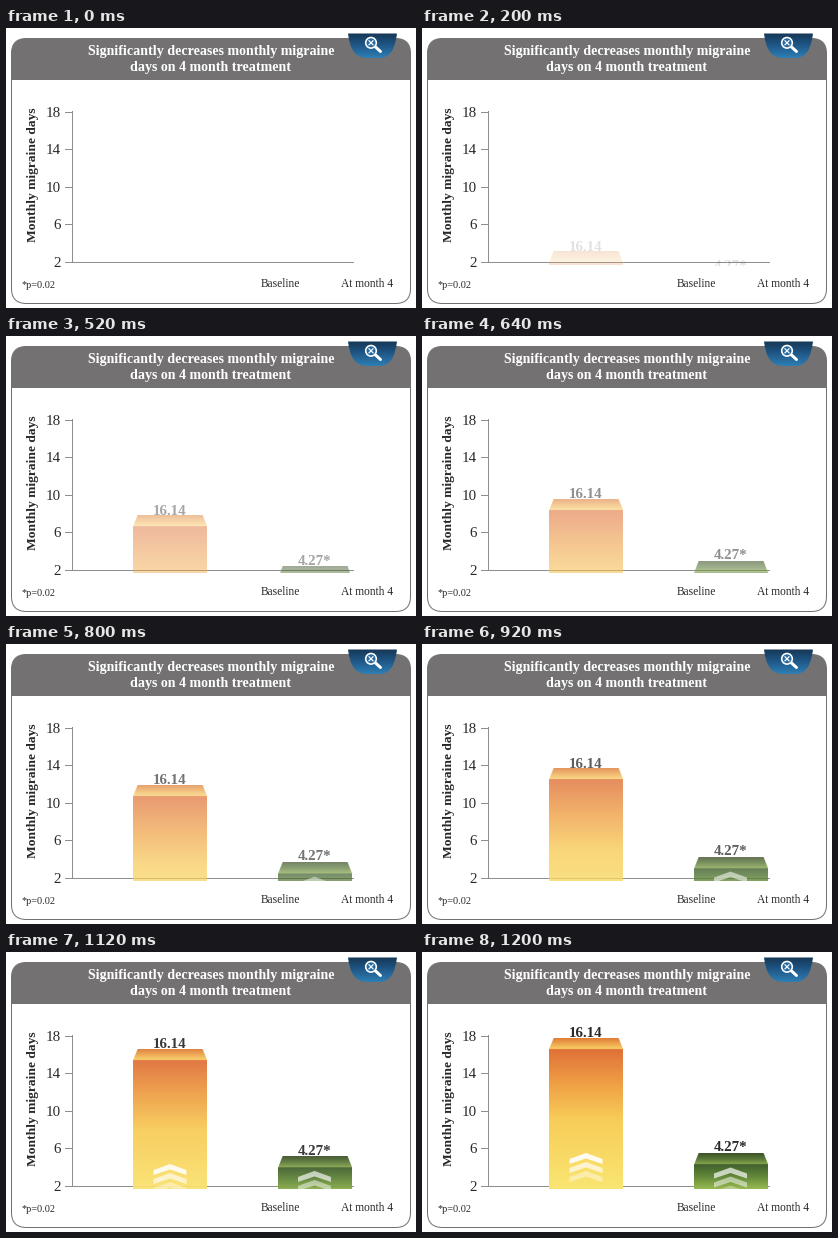
Write a matplotlib script that moves like this. It is 410x280 px and loops after 8 s.

```python
import numpy as np
import matplotlib.pyplot as plt
from matplotlib.animation import FuncAnimation
from matplotlib.colors import to_rgb
from matplotlib.patches import Circle, FancyBboxPatch, PathPatch, Polygon, Rectangle
from matplotlib.path import Path
from matplotlib.transforms import Affine2D

W, H = 410, 280
DPI = 80           # divides both sides into exact binary fractions
PT = 72 / DPI      # points per pixel
STEP = 40          # ms per frame
FRAMES = 200
FIRST, LAST = 1, 30  # frames between which the bars rise
FLOOR = 237.5      # bars are hidden below this line

GREY = "#737172"
INK = "#2b2829"
AXIS = "#8f8d8e"
ORANGE = [(0, "#e07038"), (0.25, "#efa045"), (0.5, "#f8cc58"), (1, "#fae672")]
ORANGE_CAP = [(0, "#dd7c36"), (0.5, "#eea44c"), (1, "#f8d166")]
GREEN = [(0, "#3f5f2d"), (0.5, "#648a3a"), (1, "#9abb52")]
GREEN_CAP = [(0, "#3c5029"), (0.5, "#587637"), (1, "#86a64b")]

fig = plt.figure(figsize=(W / DPI, H / DPI), dpi=DPI, facecolor="white")


def layer(height, z):
    """Transparent axes in pixel units, y down, covering the top of the stage."""
    ax = fig.add_axes([0, 1 - height / H, 1, height / H], zorder=z)
    ax.set(xlim=(0, W), ylim=(height, 0))
    ax.axis("off")
    return ax


def ramp(stops, n):
    """Column of n colours running through the given stops."""
    at = [s for s, _ in stops]
    rgb = np.array([to_rgb(c) for _, c in stops])
    t = (np.arange(n) + 0.5) / n
    return np.stack([np.interp(t, at, rgb[:, i]) for i in range(3)], axis=1)


def picture(ax, img, x0, y0, x1, y1, **kw):
    return ax.imshow(img, extent=(x0, x1, y1, y0), aspect="auto", **kw)


def gradient(ax, stops, x0, y0, x1, y1, **kw):
    return picture(ax, ramp(stops, 64)[:, None, :], x0, y0, x1, y1, **kw)


def label(ax, x, y, s, size, color=INK, weight="normal", ha="center", **kw):
    return ax.text(x, y, s, fontsize=size * PT, color=color, weight=weight, ha=ha,
                   va=kw.pop("va", "baseline"), family="Liberation Serif", **kw)


def line(ax, xs, ys, width=1, color=AXIS, **kw):
    ax.plot(xs, ys, color=color, lw=width * PT, scalex=False, scaley=False, **kw)


def draw_panel(ax):
    box = dict(boxstyle="round,pad=0,rounding_size=15")
    panel = FancyBboxPatch((5.5, 10.5), 399, 265, fc="white", ec="none", **box)
    ax.add_patch(panel)
    head = Rectangle((5, 10), 401, 42, fc=GREY, ec="none", zorder=1.1)
    ax.add_patch(head)
    head.set_clip_path(panel)
    ax.add_patch(FancyBboxPatch((5.5, 10.5), 399, 265, fc="none", ec=GREY,
                                lw=PT, zorder=1.2, **box))
    label(ax, 205, 26.5, "Significantly decreases monthly migraine", 14, "white", "bold")
    label(ax, 205, 42.5, "days on 4 month treatment", 14, "white", "bold")


def draw_badge(ax):
    tab = Path([(342, 5.5), (391, 5.5), (389, 20), (385, 29), (374, 30), (360, 30),
                (348, 29), (344, 20), (342, 5.5)],
               [1, 2, 4, 4, 4, 2, 4, 4, 4])
    shape = PathPatch(tab, fc="none", ec="none")
    ax.add_patch(shape)
    fill = gradient(ax, [(0, "#163654"), (0.4, "#1d5280"), (1, "#2f82b8")],
                    341, 5, 392, 31, zorder=2)
    fill.set_clip_path(shape)
    line(ax, [369, 374.5], [18.5, 23.5], 3, "white", zorder=3, solid_capstyle="round")
    ax.add_patch(Circle((365, 14.8), 5.3, fc="#2a6b9f", ec="white", lw=1.6 * PT, zorder=4))
    for d in (-1, 1):
        line(ax, [363, 367], [14.8 - 2 * d, 14.8 + 2 * d], 1.2, "white", zorder=5)


def draw_axes(ax):
    for x in (127.5, 271.5):
        rows = np.linspace(0.82, 0.97, 32)[:, None, None]
        shade = picture(ax, np.ones((32, 1, 3)) * rows, x, 234, x + 74, 241)
        edge = Polygon([(x, 234), (x + 74, 234), (x + 70, 241), (x + 4, 241)],
                       fc="none", ec="none")
        ax.add_patch(edge)
        shade.set_clip_path(edge)
    line(ax, [65.5, 65.5], [83, 234], zorder=2)
    line(ax, [59, 347], [233.5, 233.5], zorder=2)
    for i, value in enumerate((18, 14, 10, 6, 2)):
        y = 83.5 + 37.5 * i
        line(ax, [59, 65.5], [y, y], zorder=2)
        label(ax, 54.5, y + 5.2, str(value), 15, ha="right")
    label(ax, 27, 147, "Monthly migraine days", 13.5, weight="bold",
          rotation=90, va="center")
    label(ax, 15, 260.5, "*p=0.02", 10.2, ha="left")


def draw_legend(ax):
    for x, text_x, text, stops in (
            (229, 255, "Baseline", [(0, "#de7a40"), (0.5, "#f2ae52"), (1, "#fbe878")]),
            (308, 335, "At month 4", [(0, "#3b5630"), (0.5, "#5f8139"), (1, "#9aba50")])):
        gradient(ax, stops, x, 249, x + 15, 261)
        label(ax, text_x, 258.8, text, 11.5, ha="left")


class Bar:
    """Box with a bevelled cap, chevrons and a value, rising from the floor."""

    WIDTH, CAP, SCALE = 74, 11, 4

    def __init__(self, ax, x, top, travel, front, cap, text, gap, arrows, glow):
        self.travel = travel
        self.shift = Affine2D()
        move = self.shift + ax.transData
        mid = x + self.WIDTH / 2
        self.image = picture(ax, self.sprite(238 - top, front, cap),
                             x, top, x + self.WIDTH, 238, transform=move)
        self.arrows = []
        for i, strength in enumerate((0.92, 0.68, 0.42)):
            y = arrows + 9 * i
            points = [(-16.5, 6), (0, 0), (16.5, 6), (16.5, 11), (0, 5.5), (-16.5, 11)]
            arrow = Polygon([(mid + dx, y + dy) for dx, dy in points],
                            fc="white", ec="none", transform=move, zorder=2)
            ax.add_patch(arrow)
            self.arrows.append((arrow, strength * glow))
        self.value = label(ax, mid, top - gap, text, 15, weight="bold",
                           transform=move, clip_on=True)

    def sprite(self, height, front, cap):
        s = self.SCALE
        rows, cols, cap_rows = int(height * s), self.WIDTH * s, self.CAP * s
        colors = np.vstack([ramp(cap, cap_rows), ramp(front, rows - cap_rows)])
        img = np.ones((rows, cols, 4))
        img[..., :3] = colors[:, None, :]
        inset = np.clip(4.5 * s * (1 - np.arange(rows) / cap_rows), 0, None)[:, None]
        c = np.arange(cols)[None, :]
        img[..., 3] = (c >= inset) & (c < cols - inset)
        return img

    def place(self, p):
        self.shift.clear().translate(0, self.travel * (1 - p))
        fade = p ** 0.8
        self.image.set_alpha(fade)
        self.value.set_alpha(p)
        for arrow, strength in self.arrows:
            arrow.set_alpha(strength * fade)


base = layer(H, 1)
draw_panel(base)
draw_badge(base)
draw_axes(base)
draw_legend(base)

stage = layer(FLOOR, 2)
bars = [
    Bar(stage, 127, 86.5, 160, ORANGE, ORANGE_CAP, "16.14", 1.5, 201, 1),
    Bar(stage, 271.5, 202, 50, GREEN, GREEN_CAP, "4.27*", 2.8, 215.5, 0.75),
]
for ax, height in ((base, H), (stage, FLOOR)):
    ax.set(xlim=(0, W), ylim=(height, 0))


def update(k):
    p = min(max((k - FIRST) / (LAST - FIRST), 0), 1)
    for bar in bars:
        bar.place(p)
    return []


anim = FuncAnimation(fig, update, frames=FRAMES, interval=STEP, repeat=True,
                     repeat_delay=0, cache_frame_data=False)
plt.show()
```
